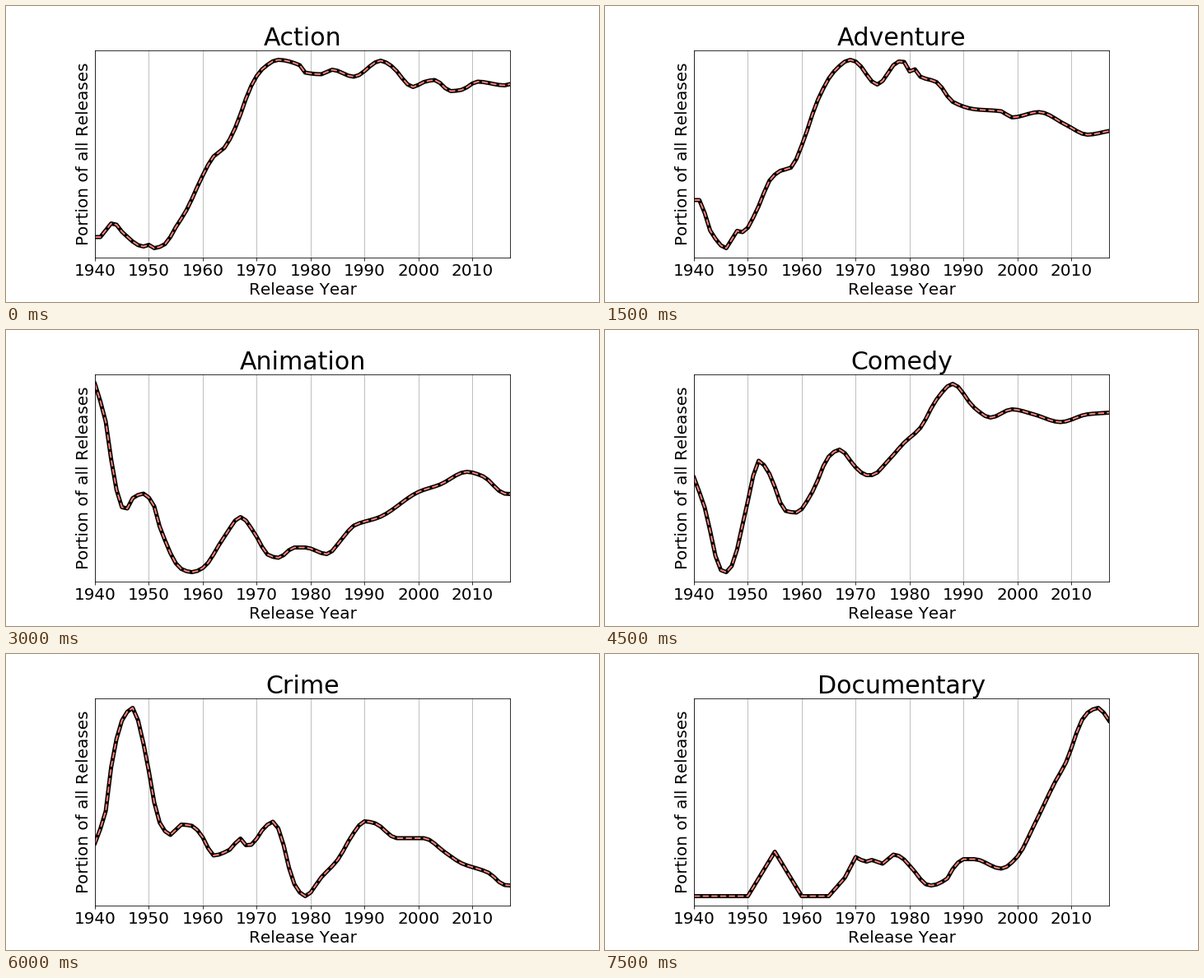
A matplotlib script that plays this animation: 720 px wide and 360 px high, repeating every 8000 ms.

```python
import numpy as np
import matplotlib.pyplot as plt
from matplotlib.animation import FuncAnimation

plt.rcParams["font.family"] = "DejaVu Sans"
plt.rcParams["text.kerning_factor"] = 6

YEARS = np.arange(40, 118)   # counted from 1900
TOP, BOTTOM = 54, 306        # plot area rows on the stage
STEP_MS = 500
HOLD = 3                     # steps each genre stays


def smooth(points, years=YEARS):
    """Monotone cubic through (year, row) points, flat at peaks and dips."""
    x, y = np.array(points, float).T
    gap, rise = np.diff(x), np.diff(y)
    slope = rise / gap
    a, b = slope[:-1], slope[1:]
    same = a * b > 0
    inner = np.where(same, 2 * a * b / np.where(same, a + b, 1), 0)
    tangent = np.array([slope[0], *inner, slope[-1]])

    i = np.clip(np.searchsorted(x, years, side="right") - 1, 0, len(gap) - 1)
    t = (years - x[i]) / gap[i]
    m0, m1 = gap[i] * tangent[i], gap[i] * tangent[i + 1]
    d = rise[i]
    return y[i] + t * (m0 + t * (3 * d - 2 * m0 - m1 + t * (m0 + m1 - 2 * d)))


def straight(points, years):
    return np.interp(years, *np.transpose(points))


action = smooth([
    (40, 281), (41, 281), (43, 264.5), (44, 266), (45, 274.5), (49, 292.5),
    (50, 290.5), (51, 294.5), (53, 289.5), (55, 269), (57, 248), (60, 206),
    (62, 183), (64, 172.5), (66, 148.5), (69, 97), (71, 77), (74, 65.5),
    (78, 72), (79, 81), (82, 83), (84, 77.5), (88, 86), (93, 66.5),
    (95, 73), (99, 98.5), (101, 92.5), (103, 90), (106, 103.5), (108, 102),
    (111, 92), (116, 96.5), (117, 95)])

adventure = smooth([
    (40, 236), (41, 236), (43, 273), (46, 294.5), (48, 273.5), (49, 275),
    (52, 243.5), (54, 212.5), (56, 200.5), (58, 196.5), (60, 169.5),
    (63, 114), (66, 79.5), (69, 65.5), (70, 67.5), (74, 95.5), (78, 67.5),
    (79, 68), (80, 79.5), (81, 77), (82, 86), (85, 92.5), (88, 116.5),
    (92, 125.5), (97, 128), (99, 135.5), (104, 129), (109, 144.5),
    (113, 156.5), (117, 152)])

animation = smooth([
    (40, 65.5), (42, 111.5), (43, 157), (45, 215.5), (46, 217), (47, 204.5),
    (49, 199), (51, 214.5), (52, 239), (56, 290.5), (58, 294.5), (60, 289.5),
    (64, 251.5), (67, 227.5), (70, 251.5), (72, 273), (74, 277), (77, 264.5),
    (79, 264.5), (83, 272.5), (86, 252.5), (88, 238), (93, 227), (100, 197),
    (104, 188), (109, 172.5), (112, 178), (116, 199), (117, 199.5)])

comedy = smooth([
    (40, 179.5), (42, 216), (45, 292), (46, 294.5), (47, 287), (50, 208),
    (52, 159), (54, 175), (57, 220), (59, 222), (62, 196.5), (65, 154),
    (67, 145.5), (70, 167), (72, 176.5), (73, 176.5), (76, 159), (79, 137),
    (82, 119), (85, 84.5), (88, 65.5), (92, 94.5), (95, 106.5), (99, 96.5),
    (103, 102.5), (108, 112), (113, 102.5), (117, 100.5)])

crime = smooth([
    (40, 230), (42, 191), (43, 138), (45, 81), (47, 65.5), (49, 109),
    (52, 205), (54, 220), (56, 207.5), (58, 209), (60, 223), (62, 245),
    (65, 238), (67, 224.5), (68, 232.5), (69, 232), (71, 214.5), (73, 204),
    (74, 212), (77, 280), (79, 294.5), (82, 271.5), (85, 250.5), (88, 217.5),
    (90, 203.5), (92, 206), (96, 224), (101, 224), (105, 241.5),
    (108, 254.5), (113, 266), (116, 281), (117, 281.5)])

# Sparse early years join up in straight runs.
early, late = YEARS[YEARS < 70], YEARS[YEARS >= 70]
documentary = np.concatenate([
    straight([(40, 294.5), (50, 294.5), (55, 240.5), (60, 294.5),
              (65, 294.5), (68, 272), (70, 247)], early),
    smooth([(70, 247), (72, 252.5), (73, 250.5), (75, 255), (77, 244),
            (78, 245.5), (81, 265), (83, 280), (84, 281.5), (87, 273),
            (88, 261.5), (90, 249.5), (92, 249.5), (97, 261), (100, 246.5),
            (103, 209.5), (107, 155.5), (109, 132), (112, 80), (113, 71.5),
            (115, 65.5), (117, 81)], late)])

GENRES = [("Action", action), ("Adventure", adventure),
          ("Animation", animation), ("Comedy", comedy),
          ("Crime", crime), ("Documentary", documentary)]

fig = plt.figure(figsize=(10, 5), dpi=72, facecolor="white")
ax = fig.add_axes([0.15, 0.15, 0.7, 0.7])
ax.set_xlim(1940, 2017)
ax.set_ylim(BOTTOM, TOP)
ax.set_xticks(range(1940, 2011, 10))
ax.set_yticks([])
ax.tick_params(labelsize=20)
ax.grid(axis="x")
ax.set_xlabel("Release Year", fontsize=20)
ax.set_ylabel("Portion of all Releases", fontsize=20)
title = ax.set_title("", fontsize=30)
outline, = ax.plot([], [], color="black", lw=5)
dashes, = ax.plot([], [], color="salmon", lw=2, ls="--")


def update(step):
    name, rows = GENRES[step // HOLD]
    title.set_text(name)
    for line in (outline, dashes):
        line.set_data(1900 + YEARS, rows)
    return title, outline, dashes


anim = FuncAnimation(fig, update, frames=16, interval=STEP_MS,
                     init_func=lambda: update(0), repeat=True,
                     repeat_delay=0, blit=False)
plt.show()
```
